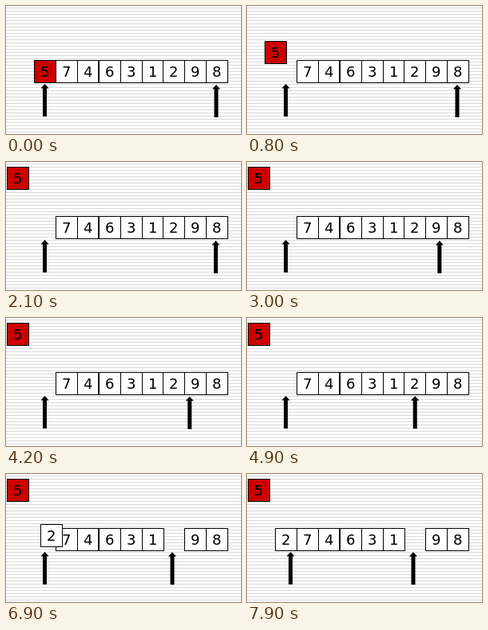
An HTML page for the animation above (8 s loop, 294x161 px).

```html
<!DOCTYPE html>
<html lang="en">
<head>
<meta charset="utf-8">
<title>Partition step</title>
<style>
  html, body { margin: 0; width: 100%; height: 100%; overflow: hidden; background: #fff; }
  svg { display: block; width: 294px; height: 161px; }
  .cell rect { fill: #fff; stroke: #000; shape-rendering: crispEdges; }
  .cell.pivot rect { fill: #c00; }
  text { font: 18px "DejaVu Sans", Verdana, sans-serif; text-anchor: middle; }
</style>
</head>
<body>
<svg viewBox="0 0 294 161">
  <defs>
    <pattern id="rules" width="4" height="4" patternUnits="userSpaceOnUse">
      <rect y="2" width="4" height="1" fill="#d9d9d9" shape-rendering="crispEdges"/>
    </pattern>
    <path id="arrow" d="M0 0 L5 5.5 H2.5 V41 H-2.5 V5.5 H-5 Z"/>
  </defs>
  <rect width="294" height="161" fill="url(#rules)"/>
  <g id="cells"></g>
  <use id="left" href="#arrow"/>
  <use id="right" href="#arrow"/>
</svg>
<script>
  const LOOP = 8000, TICK = 100, ROW_Y = 68;
  const SVG = "http://www.w3.org/2000/svg";
  const byId = id => document.getElementById(id);
  const place = (el, x, y) => el.setAttribute("transform", `translate(${x} ${y})`);

  // Constant acceleration to the midpoint, then constant deceleration
  function ease(t, start, duration) {
    const u = Math.min(1, Math.max(0, (t - start) / duration));
    return u < 0.5 ? 2 * u * u : 1 - 2 * (1 - u) ** 2;
  }

  function add(parent, tag, attrs, text = "") {
    const el = document.createElementNS(SVG, tag);
    for (const key in attrs) el.setAttribute(key, attrs[key]);
    el.textContent = text;
    return parent.appendChild(el);
  }

  const slots = [35, 62, 89, 116, 143, 170, 196, 223, 250];
  const cells = {};
  [5, 7, 4, 6, 3, 1, 2, 9, 8].forEach((value, i) => {
    const g = add(byId("cells"), "g", { class: value === 5 ? "cell pivot" : "cell" });
    const wide = value === 6 ? 1 : 0;
    add(g, "rect", { x: 0.5 - wide, y: 0.5, width: 27 + wide, height: 28 });
    if (wide) add(g, "rect", { x: 0.5, y: 0.5, width: 27, height: 28 });
    add(g, "text", { x: 13.7, y: 21 }, value);
    place(g, slots[i], ROW_Y);
    cells[value] = g;
  });
  byId("cells").append(cells[5], cells[2]);

  function draw(t) {
    const lift = ease(t, 0, 1800);
    place(cells[5], Math.round(35 - 34 * lift), Math.round(ROW_Y - 62 * lift));

    const hop = ease(t, 5380, 1800);
    const rise = 43 * Math.max(0, Math.sin(Math.PI * hop)) ** 1.1;
    place(cells[2], Math.round(196 - 161 * hop), Math.round(ROW_Y - rise));

    const step1 = ease(t, 1950, 1500), step2 = ease(t, 3700, 1500);
    place(byId("right"), 263 - 27 * step1 - 28 * step2, 99 - 0.8 * step2);
    place(byId("left"), 48.5 + 27 * ease(t, 7400, 1500), 98);
  }

  function frame(now) {
    draw(Math.floor((now % LOOP) / TICK) * TICK);
    requestAnimationFrame(frame);
  }
  draw(0);
  requestAnimationFrame(frame);
</script>
</body>
</html>
```
